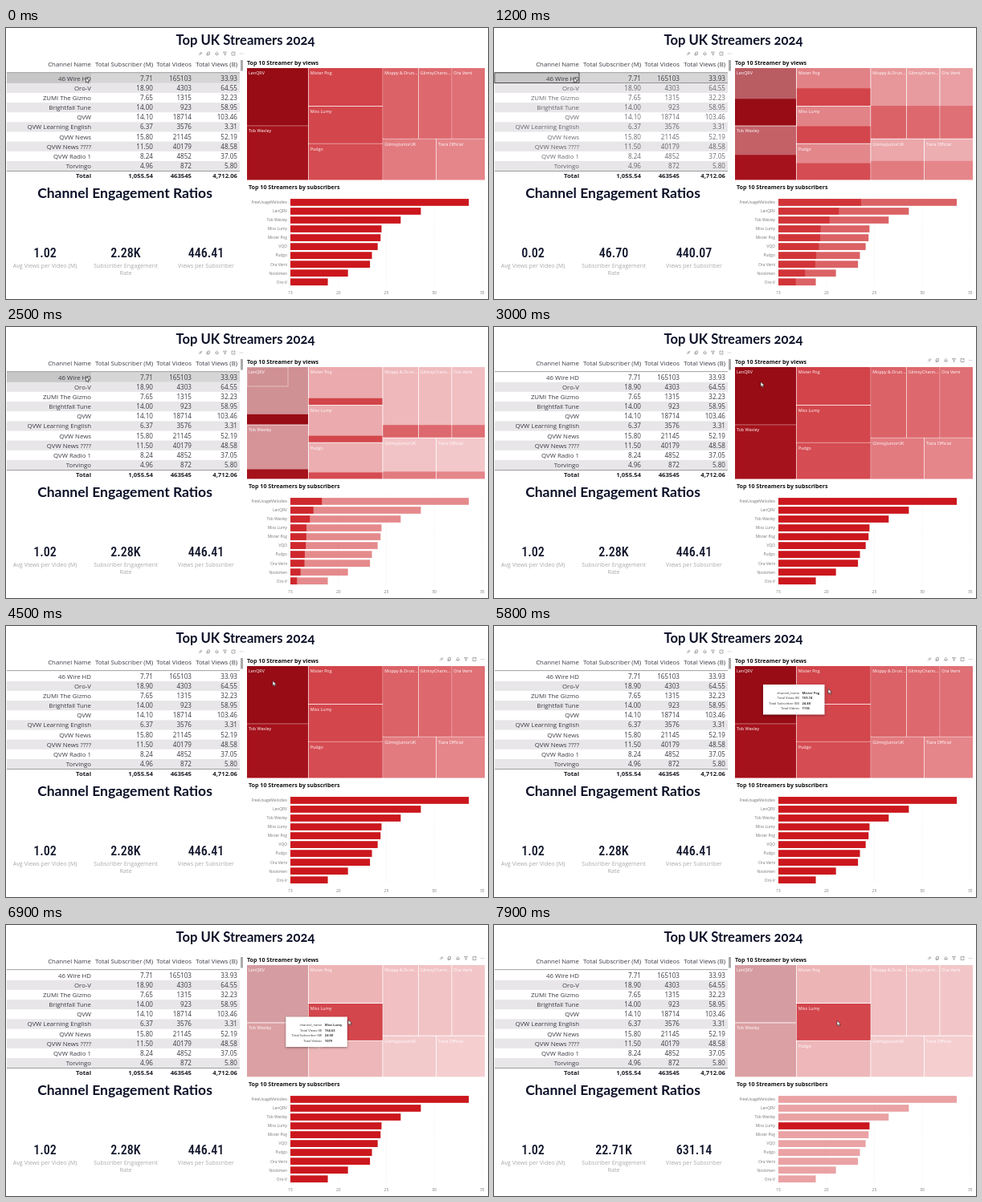
Recreate the animation shown at these times as an HTML page. Size 600 by 338 pixels, loop 8000 ms.

```html
<!DOCTYPE html>
<html lang="en">
<head>
<meta charset="utf-8">
<title>Dashboard</title>
<style>
html, body { margin: 0; width: 100%; height: 100%; overflow: hidden; background: #fff; }
svg { display: block; width: 100vw; height: 100vh; font-family: "Open Sans", "Noto Sans", sans-serif; }
.title { font: 700 16.6px Lato, "Open Sans", sans-serif; font-variant-numeric: oldstyle-nums; fill: #0c1028; }
.head { font-weight: 700; font-size: 7.1px; fill: #111; }
.cell { font-size: 7.8px; fill: #3a3a44; }
.num { font-size: 8.1px; }
.total { font-weight: 700; font-size: 7.7px; fill: #1c1c24; }
.kpi { font: 500 16px "Roboto Condensed", Roboto, sans-serif; font-stretch: 75%; fill: #10142a; }
.note { font-size: 7.2px; fill: #a9a9a9; }
.tile { font-size: 5.4px; fill: #fff; }
.axis { font-size: 4.9px; fill: #777; }
.tip { font-size: 4.1px; fill: #333; }
.icons { fill: none; stroke: #777; stroke-width: .6; }
</style>
</head>
<body>
<svg id="stage" viewBox="0 0 600 338" preserveAspectRatio="none"></svg>
<script>
const LOOP = 8000, RED = '#cb181d';
const stage = document.getElementById('stage');

function add(parent, tag, attrs = {}, content) {
  const node = document.createElementNS('http://www.w3.org/2000/svg', tag);
  set(node, attrs);
  if (content !== undefined) node.textContent = content;
  return parent.appendChild(node);
}
function set(node, attrs) {
  for (const key in attrs) node.setAttribute(key, attrs[key]);
}
const rect = (x, y, width, height, fill, parent = stage) =>
  add(parent, 'rect', { x, y, width, height, fill });
const text = (x, y, content, cls, anchor = 'start', parent = stage) =>
  add(parent, 'text', { x, y, class: cls, 'text-anchor': anchor }, content);
const show = (node, on) => node.setAttribute('visibility', on ? 'visible' : 'hidden');
const ramp = (t, from, to) => Math.max(0, Math.min(1, (t - from) / (to - from)));
const smooth = p => p * p * (3 - 2 * p);

text(298, 21, 'Top UK Streamers 2024', 'title', 'middle');
const ratios = text(148, 211.5, 'Channel Engagement Ratios', 'title', 'middle');
ratios.style.fontSize = '17.5px';
text(300, 46, 'Top 10 Streamer by views', 'head');
text(302, 201, 'Top 10 Streamers by subscribers', 'head');

// Table
const columns = [106, 183, 231, 288];
const rows = [
  ['46 Wire HD', '7.71', '165103', '33.93'],
  ['Oro-V', '18.90', '4303', '64.55'],
  ['ZUMI The Gizmo', '7.65', '1315', '32.23'],
  ['Brightfall Tune', '14.00', '923', '58.95'],
  ['QVW', '14.10', '18714', '103.46'],
  ['QVW Learning English', '6.37', '3576', '3.31'],
  ['QVW News', '15.80', '21145', '52.19'],
  ['QVW News ????', '11.50', '40179', '48.58'],
  ['QVW Radio 1', '8.24', '4852', '37.05'],
  ['Torvingo', '4.96', '872', '5.80']
];
function tableRow(values, y, cls, parent = stage) {
  values.forEach((v, i) => text(columns[i], y, v, cls + (i && cls === 'cell' ? ' num' : ''), 'end', parent));
}
const rowTop = i => 56.6 + i * 12.15;
rows.forEach((r, i) => { if (i % 2) rect(1, rowTop(i), 290, 12.15, '#e8e6e8'); });
const hover = add(stage, 'g');
rect(1, 56, 290, 12.75, '#d6d6d6', hover);
rect(1, 56, 105, 12.75, '#c7c7c7', hover);
rect(1, 55.3, 290, .8, '#888');
rect(1, 178, 290, .8, '#888');
const picked = add(stage, 'g');
rect(1, 68.2, 290, .8, '#888', picked);
add(picked, 'rect', { x: .8, y: 55.8, width: 105.2, height: 12.7, fill: 'none', stroke: '#444', 'stroke-width': .9 });
rect(292, 40, 3, 13.5, '#aaa');
['Channel Name', 'Total Subscriber (M)', 'Total Videos', 'Total Views (B)']
  .forEach((v, i) => text(columns[i], 48, v, 'cell', 'end'));
tableRow(rows[0], 65.7, 'cell');
const otherRows = add(stage, 'g');
rows.slice(1).forEach((r, i) => tableRow(r, rowTop(i + 1) + 9.1, 'cell', otherRows));
tableRow(['Total', '1,055.54', '463545', '4,712.06'], 187.2, 'total');

// Visual header icons
function icons(x, y) {
  const g = add(stage, 'g', { class: 'icons', transform: `translate(${x} ${y})` });
  add(g, 'path', { d: 'M-2 2L0 0M-1-1L1 1M-.5-.5L1-2L2-1L.5.5' +
    'M9-2h2.5v3H9zM8-1v3h2.5' +
    'M18.5 1h4L21.8 0v-1q-1.3-2-2.6 0V0zM20 2h1' +
    'M28.5-2h4L31 0v2l-1-.7V0z' +
    'M41-2h-2v4h4V0M41 0l2-2M41.5-2H43v1.5' +
    'M49 0h.8M50.8 0h.8M52.6 0h.8' });
  return g;
}
const tableIcons = icons(242, 32), mapIcons = icons(542, 41.5);

// Indicators
const kpis = [48.5, 149, 249].map(x => text(x, 286, '', 'kpi', 'middle'));
text(48.5, 299, 'Avg Views per Video (M)', 'note', 'middle');
text(149, 299, 'Subscriber Engagement', 'note', 'middle');
text(149, 308, 'Rate', 'note', 'middle');
text(249, 299, 'Views per Subscriber', 'note', 'middle');

// Treemap
const tiles = [
  ['LenQRV', 300, 50, 376, 121.5, '#970c15'],
  ['Tob Wexley', 300, 122.4, 376, 189.3, '#a5121b'],
  ['Mister Pog', 376.8, 50, 468.5, 97.1, '#d2444a'],
  ['Miss Lumy', 376.8, 98, 468.5, 143.7, '#d3464c'],
  ['Pudgo', 376.8, 144.6, 468.5, 189.3, '#d54c52'],
  ['Moppy & Drun...', 469.3, 50, 513, 137.7, '#db6267'],
  ['GlimsyChann...', 513.8, 50, 554.5, 137.7, '#dd696e'],
  ['Ora Vemi', 555.3, 50, 596, 137.7, '#df7075'],
  ['GlimsyJuniorUK', 469.3, 138.6, 535, 189.3, '#e27b80'],
  ['Tiara Official', 535.8, 138.6, 596, 189.3, '#e5868a']
].map(([name, x, y, right, bottom, fill]) => {
  const w = right - x, h = bottom - y;
  const base = rect(x, y, w, h, fill), lit = rect(x, y, w, h, fill);
  text(x + 2, y + 8, name, 'tile');
  return { name, h, bottom, base, lit };
});
const ghost = add(stage, 'rect', { x: 300, y: 50, width: 51, height: 24, fill: 'none', stroke: '#fff', 'stroke-opacity': .5, 'stroke-width': .8 });

// Bar chart
const unit = 11.94, left = 354;
for (let v = 15; v <= 35; v += 5) {
  const x = left + (v - 15) * unit;
  if (v > 15) add(stage, 'path', { d: `M${x} 210V322`, stroke: '#e8e8e8', 'stroke-width': .6, 'stroke-dasharray': '1 1.5' });
  text(x, 332, v, 'axis', 'middle');
}
const bars = [
  ['FreeUsageMelodies', 33.6], ['LenQRV', 28.6], ['Tob Wexley', 26.5], ['Miss Lumy', 24.5],
  ['Mister Pog', 24.4], ['VQO', 24.1], ['Pudgo', 23.5], ['Ora Vemi', 23.3],
  ['Nookmen', 21], ['Oro-V', 18.9]
].map(([name, value], i) => {
  const y = 213.1 + i * 11.03, w = (value - 15) * unit;
  text(350, y + 6.2, name, 'axis', 'end');
  return { name, w, base: rect(left, y, w, 8.7, RED), lit: rect(left, y, w, 8.7, RED) };
});

// Tooltips
function tooltip(x, y, values) {
  const g = add(stage, 'g', { transform: `translate(${x} ${y})` });
  g.style.filter = 'drop-shadow(0 1px 1.5px rgba(0,0,0,.4))';
  rect(0, 0, 76.5, 37.5, '#fff', g);
  ['channel_name', 'Total Views (B)', 'Total Subscriber (M)', 'Total Videos'].forEach((label, i) => {
    const line = 11.5 + i * 6.5;
    text(45, line, label, 'tip', 'end', g);
    text(48.5, line, values[i], 'tip', 'start', g).style.fontWeight = 700;
  });
  return g;
}
const pogTip = tooltip(335, 73, ['Mister Pog', '159.74', '24.40', '1136']);
const lumyTip = tooltip(348.3, 114.5, ['Miss Lumy', '154.63', '24.50', '1079']);

// Pointer
const pointer = add(stage, 'path', { d: 'M0 0V6L1.5 4.7L2.5 6.8L3.5 6.3L2.6 4.3H4.5Z', fill: '#fff', stroke: '#222', 'stroke-width': .6 });
const stops = [
  [0, 99.5, 62], [2650, 99.5, 62], [2980, 332, 68.5], [5150, 332, 68.5], [5550, 416, 78.5],
  [6250, 416, 78.5], [6600, 426, 118.5], [7300, 426, 118.5], [7600, 427, 119.5], [LOOP, 427, 119.5]
];
function pointerAt(t) {
  const i = stops.findIndex(s => s[0] > t);
  const [t0, x0, y0] = stops[i - 1], [t1, x1, y1] = stops[i];
  const k = smooth(ramp(t, t0, t1));
  return `translate(${x0 + (x1 - x0) * k} ${y0 + (y1 - y0) * k})`;
}

const dim = level => .4 + .6 * level;

function render(t) {
  const rowPicked = t >= 1000 && t < 2420;
  const tilePicked = t >= 6700;
  const filtered = t >= 7300;

  show(hover, t < 2700);
  show(picked, rowPicked);
  otherRows.setAttribute('opacity', rowPicked ? .75 : 1);
  show(tableIcons, t < 6500);
  show(mapIcons, t >= 2900);
  show(ghost, t >= 2450 && t < 2600);

  const values = filtered ? ['1.02', '22.71K', '631.14']
    : t >= 1100 && t < 2420 ? ['0.02', '46.70', '440.07']
    : ['1.02', '2.28K', '446.41'];
  kpis.forEach((k, i) => { k.textContent = values[i]; });

  const share = t < 2000 ? 1 - ramp(t, 1040, 1340) : ramp(t, 2448, 2748);
  for (const tile of tiles) {
    const level = tilePicked && tile.name !== 'Miss Lumy' ? 0 : share;
    set(tile.base, { opacity: dim(smooth(level)) });
    set(tile.lit, { y: tile.bottom - tile.h * level, height: tile.h * level });
  }
  // The highlight gains strength as it shrinks away from the fading base.
  const barShare = filtered ? 1 - ramp(t, 7300, 7600) : share;
  for (const bar of bars) {
    const level = filtered && bar.name === 'Miss Lumy' ? 1 : barShare;
    set(bar.base, { opacity: dim(level) });
    set(bar.lit, { width: bar.w * level, opacity: 1 - .85 * level });
  }

  show(pogTip, t >= 5600 && t < 6350);
  show(lumyTip, t >= 6650 && t < 7350);
  pointer.setAttribute('transform', pointerAt(t));
}

const start = performance.now();
function tick() {
  render((performance.now() - start) % LOOP);
  requestAnimationFrame(tick);
}
tick();
</script>
</body>
</html>
```
